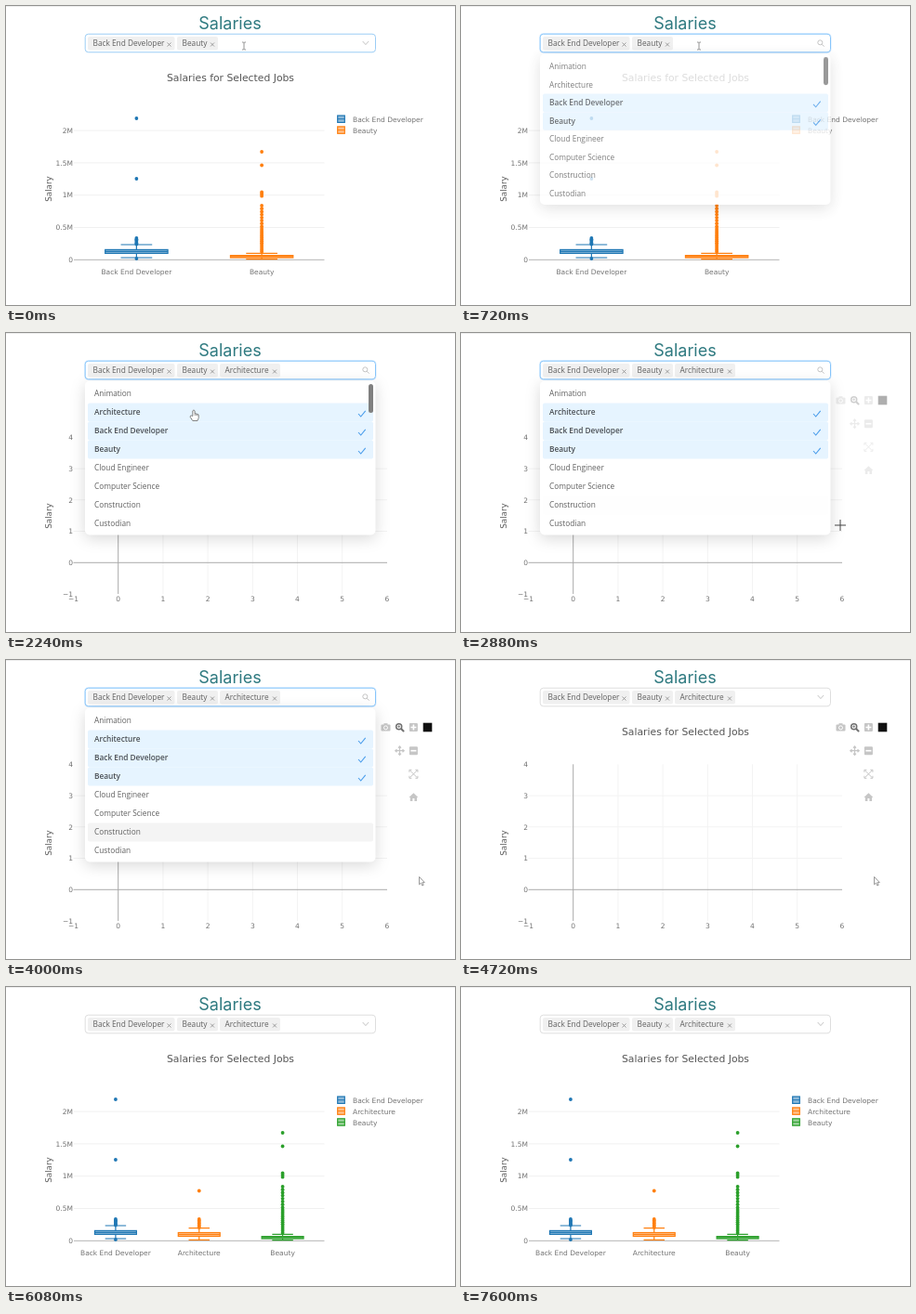
These frames come from a looping animation (483 by 322 pixels, 7680 ms). An HTML page:

```html
<!DOCTYPE html>
<html lang="en">
<head>
<meta charset="utf-8">
<title>Salaries</title>
<style>
html, body { margin: 0; width: 100%; height: 100%; overflow: hidden; background: #fff; }
svg { display: block; }
text { font: 7.5px "DejaVu Sans", sans-serif; fill: #727272; }
.head { font: 18px Inter, sans-serif; fill: #2f7a80; }
.title { font-size: 10.8px; fill: #555; }
.axis { font-size: 8.8px; fill: #5c5c5c; }
.ui { font: 8.3px "Open Sans", sans-serif; fill: #606060; }
.sel { font-weight: 600; fill: #4a4f54; }
.panel { filter: drop-shadow(0 4px 8px rgba(0,0,0,.15)); }
</style>
</head>
<body>
<svg id="stage" width="483" height="322" viewBox="0 0 483 322"></svg>
<script>
const LOOP = 7680, STEP = 80;
const OPEN = 560, PICK = 1840, CLOSE = 4320, LOADED = 5520, LEAVE = 5680;
const BLUE = '#1f77b4', ORANGE = '#ff7f0e', GREEN = '#2ca02c';
const JOBS = ['Animation', 'Architecture', 'Back End Developer', 'Beauty',
  'Cloud Engineer', 'Computer Science', 'Construction', 'Custodian'];

const clamp = v => Math.max(0, Math.min(1, v));
const ease = v => v * v * (3 - 2 * v);
const range = (a, b, step) => Array.from({length: Math.floor((b - a) / step) + 1}, (_, i) => a + i * step);

const rect = (x, y, w, h, fill, more = '') =>
  `<rect x="${x}" y="${y}" width="${w}" height="${h}" fill="${fill}" ${more}/>`;
const path = (d, stroke, width = 1, more = '') =>
  `<path d="${d}" fill="none" stroke="${stroke}" stroke-width="${width}" ${more}/>`;
const text = (s, x, y, cls = '', anchor = 'start', more = '') =>
  `<text x="${x}" y="${y}" class="${cls}" text-anchor="${anchor}" ${more}>${s}</text>`;
const group = (s, attrs) => `<g ${attrs}>${s}</g>`;

// Box plots: all values are stage heights
const SHAPES = {
  'Back End Developer': {box: [262.4, 264.4, 266.4], ends: [257, 271],
    dots: [121, 186, ...range(250, 256.5, 1.3), 272]},
  'Architecture': {box: [264.5, 266.5, 268.5], ends: [259.7, 272.3],
    dots: [219.5, ...range(250, 259, 1.5)]},
  'Beauty': {box: [268.6, 269.9, 271], ends: [266.4, 272.6],
    dots: [157, 171.5, 200.5, 202.5, 204.7, ...range(215, 239, 3.2), ...range(240, 266, 1.9)]}
};

function boxPlot(job, x, half, color) {
  const {box: [q3, mid, q1], ends: [hi, lo], dots} = SHAPES[job];
  const w = half / 2;
  return rect(x - half, q3, half * 2, q1 - q3, color, `fill-opacity=".5" stroke="${color}" stroke-width="1.2"`) +
    path(`M${x - half} ${mid}h${half * 2}M${x} ${q3}V${hi}M${x} ${q1}V${lo}M${x - w} ${hi}h${half}M${x - w} ${lo}h${half}`, color, 1.2) +
    dots.map(y => `<circle cx="${x}" cy="${y}" r="1.9" fill="${color}"/>`).join('');
}

const labels = text('Salaries for Selected Jobs', 241.5, 81, 'title', 'middle') +
  text('Salary', 0, 0, 'axis', 'middle', 'transform="translate(49 197) rotate(-90)"');

function salaryChart(jobs) {
  const colors = [BLUE, ORANGE, GREEN], gap = 269.5 / jobs.length;
  let s = labels;
  ['0', '0.5M', '1M', '1.5M', '2M'].forEach((label, i) => {
    const y = 273.3 - i * 34.8;
    s += path(`M73 ${y}H342.5`, i ? '#f0f0f0' : '#b4b4b4') + text(label, 72, y + 2.7, '', 'end');
  });
  jobs.forEach((job, i) => {
    const x = 73 + gap * (i + .5), y = 118 + i * 11.9;
    s += boxPlot(job, x, gap / 4, colors[i]) + text(job, x, 289, '', 'middle') +
      rect(356.7, y, 7.6, 7.4, colors[i], `fill-opacity=".5" stroke="${colors[i]}" stroke-width="1.2"`) +
      path(`M356.7 ${y + 3.7}h7.6`, colors[i], 1) + text(job, 373, y + 6.7);
  });
  return s;
}

function emptyChart() {
  let s = labels;
  for (let n = -1; n <= 6; n++) {
    const x = 120.7 + n * 48.2, y = 247.3 - n * 33.75, name = String(n).replace('-', '−');
    if (n > 0 && n < 6) s += path(`M${x} 112.3V281`, '#f3f3f3');
    s += text(name, x, 289, '', 'middle');
    if (n > 4) continue;
    if (n > 0 && n < 4) s += path(`M72.5 ${y}H410`, '#f3f3f3');
    s += text(name, 72, y + 2.7, '', 'end');
  }
  return s + path('M72.5 247.3H410M120.7 112.3V281', '#aaa');
}

function modeBar() {
  const at = (x, y, s) => group(s, `transform="translate(${x} ${y})"`);
  const pale = '#c6c6c6', dark = '#707070';
  const tile = d => rect(-4.5, -4.5, 9, 9, pale, 'rx="1"') + path(d, '#fff', 1.6);
  return at(408.5, 72.5, rect(-5, -3, 10, 7, pale, 'rx="1"') + rect(-2, -4.3, 4, 2, pale) +
      `<circle cy=".4" r="2" fill="${pale}" stroke="#fff"/>`) +
    at(423.5, 72.5, `<circle cx="-.8" cy="-.8" r="3" fill="none" stroke="${dark}" stroke-width="1.5"/>` +
      path('M1.5 1.5L4.6 4.6', dark, 2) + path('M-2.3 -.8h3M-.8 -2.3v3', dark, .8)) +
    at(438.4, 72.5, tile('M-3 0h6M0 -3v6')) +
    rect(448.7, 67.7, 9.6, 9.6, '#111') +
    at(423.5, 97.7, path('M-4.5 0h9M0 -4.5v9M-3 -1.5L-4.7 0L-3 1.5M3 -1.5L4.7 0L3 1.5M-1.5 -3L0 -4.7L1.5 -3M-1.5 3L0 4.7L1.5 3', pale, 1.2)) +
    at(438.4, 97.7, tile('M-3 0h6')) +
    at(438.4, 122.8, path('M-4 -4L4 4M4 -4L-4 4M-4.5 -2v-2.5h2.5M2 -4.5h2.5v2.5M4.5 2v2.5h-2.5M-2 4.5h-2.5v-2.5', pale, 1)) +
    at(438.4, 147.7, `<path d="M-5 .3L0 -4.5L5 .3H3.6V4.3H1V1.3H-1V4.3H-3.6V.3Z" fill="${pale}"/>`);
}

function selectBox(open, blue, picked) {
  const tags = [['Back End Developer', 88, 93.5], ['Beauty', 184, 44], ['Architecture', 230, 65]];
  let s = open ? rect(84.7, 29.7, 313.2, 20.6, 'none', 'rx="4" stroke="#e3f2ff" stroke-width="1.5"') : '';
  s += rect(85.2, 30.2, 312.3, 19.6, '#fff', `rx="3.5" stroke="${open ? '#86c5fb' : blue ? '#9bcdf5' : '#dedede'}"`);
  for (const [name, x, w] of tags.slice(0, picked ? 3 : 2)) {
    const c = x + w - 6;
    s += rect(x, 33, w, 14.5, '#f0f0f0', 'rx="2"') + text(name, x + 5.5, 43.4, 'ui') +
      path(`M${c - 2} 39.5l4 4m0 -4l-4 4`, '#888', .8);
  }
  return s + (open
    ? '<circle cx="386.3" cy="39.3" r="2.5" fill="none" stroke="#c4c4c4"/>' + path('M388.2 41.2l2.4 2.4', '#c4c4c4')
    : path('M383.7 38l3.2 3.6l3.2 -3.6', '#c4c4c4'));
}

// Time at which each row lights up under the pointer
const HOVERS = [[1120, 0], [1280, 1], [2840, 6]];

function hoverAt(t) {
  const [since, row] = HOVERS.filter(h => h[0] <= t).pop() || [0, -1];
  return {row, glow: clamp((t - since) / 300)};
}

function dropdown(t, picked) {
  const show = Math.min(clamp((t - OPEN) / 200), clamp((CLOSE + 200 - t) / 200));
  if (!show) return '';
  const {row, glow} = hoverAt(t);
  let s = rect(85, 51.5, 312.5, 166, '#fff', 'rx="5" class="panel"');
  JOBS.forEach((job, i) => {
    const y = 55.5 + i * 20;
    const on = i === 2 || i === 3 || (i === 1 && picked);
    if (on) s += rect(88, y, 307, 20, '#e6f4ff', 'rx="2"') +
      path(`M379 ${y + 11.5}l2.7 3l5 -6.2`, '#4a9deb', 1.1);
    else if (i === row) s += rect(88, y, 307, 20, '#f4f4f4', `rx="2" opacity="${glow}"`);
    s += text(job, 95, y + 12.8, on ? 'ui sel' : 'ui');
  });
  if (t < 2640) s += rect(390, 55, 5, 31, '#808080', 'rx="2.5"');
  const k = .8 + .2 * ease(show);
  return group(s, `opacity="${show}" transform="translate(0 ${51.5 * (1 - k)}) scale(1 ${k})"`);
}

const ROUTE = [[0, 256, 43], [960, 256, 43], [1440, 202, 87], [2480, 202, 87],
  [2880, 408, 207], [3200, 444.5, 233.5], [LOOP, 444.5, 233.5]];

function pointerAt(t) {
  const i = ROUTE.findIndex(p => p[0] > t);
  const [t0, x0, y0] = ROUTE[i - 1], [t1, x1, y1] = ROUTE[i];
  const k = ease((t - t0) / (t1 - t0));
  return [x0 + (x1 - x0) * k, y0 + (y1 - y0) * k];
}

function pointer(x, y) {
  let s;
  if (y < 51) s = path('M-2 -4h1.5L0 -3.5L.5 -4H2M0 -3.5V3.5M-2 4h1.5L0 3.5L.5 4H2', '#777', .8);
  else if (x < 398) s = '<path d="M-1.2 2.5V-3.2Q0 -5 1.1 -3.2V-.3Q2 -.9 2.7 0Q3.7 -.3 4 .6Q5.2 .4 5.2 1.7V4.5L4 7.5H-1.2L-3.8 3.5Q-4 1.5 -2.3 2Z" fill="#fff" stroke="#666" stroke-width=".8"/>' +
    path('M1.1 -.3V2M2.7 0V2M4 .6V2.3', '#666', .6);
  else if (x < 411) s = path('M-6 0H6M0 -6V6', '#444', 1);
  else s = '<path d="M0 0V8.3L2 6.6L3.3 9.5L4.7 8.9L3.4 6.1H5.8Z" fill="#fff" stroke="#808080" stroke-width=".8"/>';
  return group(s, `transform="translate(${x} ${y})"`);
}

const charts = {
  two: salaryChart(['Back End Developer', 'Beauty']),
  none: emptyChart(),
  three: salaryChart(['Back End Developer', 'Architecture', 'Beauty'])
};
const bar = modeBar();
const header = rect(0, 0, 483, 1, '#eee') + text('Salaries', 241, 25, 'head', 'middle');
const stage = document.getElementById('stage');

function draw(t) {
  const picked = t >= PICK;
  const barShow = Math.min(clamp((t - 2780) / 300), clamp((LEAVE + 240 - t) / 240));
  stage.innerHTML = header +
    charts[t < PICK ? 'two' : t < LOADED ? 'none' : 'three'] +
    group(bar, `opacity="${barShow}"`) +
    selectBox(t >= OPEN && t < CLOSE, t < OPEN, picked) +
    dropdown(t, picked) +
    (t < LEAVE ? pointer(...pointerAt(t)) : '');
}

let last = -1;
function tick() {
  const t = Math.floor(performance.now() % LOOP / STEP) * STEP;
  if (t !== last) draw(last = t);
  requestAnimationFrame(tick);
}
tick();
</script>
</body>
</html>
```
